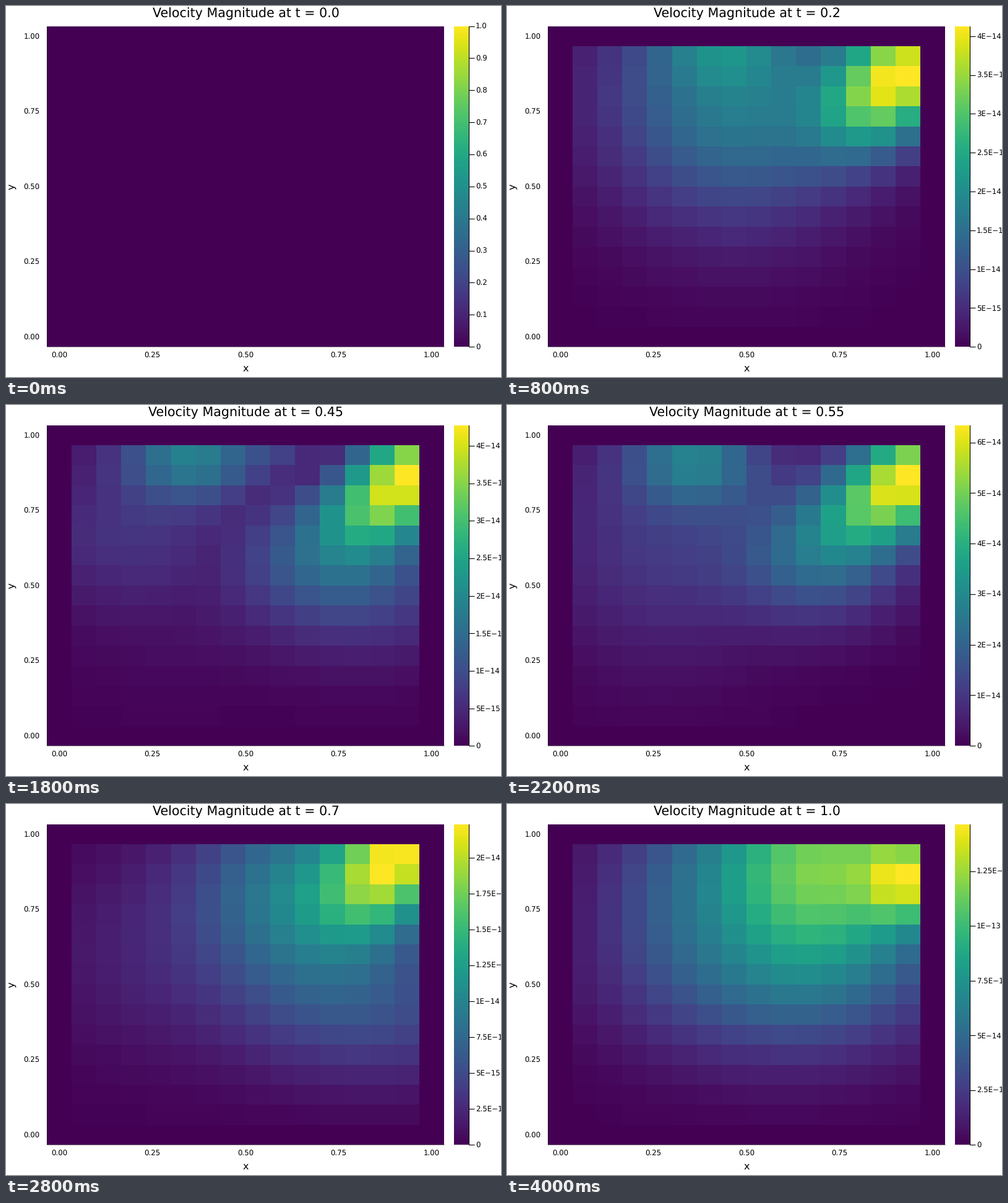
Animation of 800x600 px, one loop 4200 ms. Source, as a matplotlib script:

```python
import matplotlib.pyplot as plt
import numpy as np
from matplotlib.animation import FuncAnimation

W, H, DPI = 800, 600, 100
FRAMES, INTERVAL = 21, 200
N = 16  # cells per side
LEFT, RIGHT, TOP, BOTTOM = 65.8, 708.1, 32.6, 551.2
BAR_LEFT, BAR_RIGHT = 724, 748

X, Y = np.meshgrid(np.arange(N), np.arange(N))


def swirl(strength, x, y, width, height, tilt=0):
    """Gaussian patch of flow, in cells; tilt slopes its ridge."""
    ridge = y + tilt * (X - x)
    return strength * np.exp(-((X - x) / width) ** 2
                             - ((Y - ridge) / height) ** 2)


def speed(*swirls):
    """Relative speed of the summed flow, zero along the walls."""
    grid = np.zeros((N, N))
    grid[1:-1, 1:-1] = np.abs(sum(swirls))[1:-1, 1:-1]
    return grid / grid.max()


broad = speed(swirl(0.94, 13.7, 13, 2.8, 3, tilt=0.5),
              swirl(0.42, 7, 12, 5, 6),
              swirl(0.15, 6.5, 14.2, 2.5, 1.5))
split = speed(swirl(0.93, 14, 13, 2.6, 2.6, tilt=0.6),
              swirl(0.38, 12.5, 8, 4.5, 4),
              swirl(-0.42, 5.2, 14, 2.8, 2),
              swirl(-0.22, 9, 14.2, 1.6, 1.2),
              swirl(-0.15, 2, 10, 4, 3))
arched = speed(swirl(0.95, 14, 12.8, 3, 2.6, tilt=0.45),
               swirl(0.3, 10.5, 9, 3.5, 3.3),
               swirl(0.34, 5.5, 13.8, 2.6, 2.2),
               swirl(0.16, 4, 10, 4.5, 6))
corner = speed(swirl(0.8, 13.8, 14, 2.6, 3, tilt=0.5),
               swirl(0.45, 10, 12, 4.5, 5),
               swirl(0.18, 13, 6, 6, 3.5),
               swirl(0.07, 3, 9, 4, 5))
right = speed(swirl(0.88, 13, 14.2, 2.7, 2.6),
              swirl(0.25, 10.5, 11.5, 2.2, 2.2),
              swirl(0.42, 14, 8, 6.5, 5),
              swirl(0.03, 4, 13, 4, 3))
full = speed(swirl(0.72, 10.5, 13.5, 5, 5),
             swirl(0.48, 14, 12.7, 1.6, 2),
             swirl(0.25, 9, 7.5, 6, 4),
             swirl(0.12, 4, 12, 3, 5))

# Step, flow pattern and top speed in units of 1e-14
STAGES = [(1, right, 1.9), (3, corner, 3.2), (4, broad, 4.13),
          (7, split, 2.209), (11, arched, 6.343), (14, corner, 2.233),
          (17, right, 2.154), (20, full, 14.65)]


def state(step):
    """Relative speeds and top speed at a step."""
    if step == 0:
        return np.zeros((N, N)), 1.0
    for (a, old, old_peak), (b, new, new_peak) in zip(STAGES, STAGES[1:]):
        if step <= b:
            w = (step - a) / (b - a)
            grid = (1 - w) * old + w * new
            peak = (1 - w) * old_peak + w * new_peak
            return grid / grid.max(), peak * 1e-14


def tick_values(peak):
    power = np.floor(np.log10(peak)) - 1
    step = next(m * 10 ** power for m in (1, 2.5, 5, 10, 25)
                if peak / (m * 10 ** power) < 10.01)
    return np.arange(int(peak / step + 1e-6) + 1) * step


def tick_label(value):
    if value == 0:
        return "0"
    if value > 1e-3:
        return f"{value:.1f}"
    mantissa, exponent = f"{value:.4e}".split("e-")
    return f"{float(mantissa):g}E\u2212{int(exponent)}"


plt.rcParams.update({"font.family": "DejaVu Sans", "text.hinting": "none"})
fig = plt.figure(figsize=(W / DPI, H / DPI), dpi=DPI, facecolor="white")
ax = fig.add_axes([0, 0, 1, 1])


def label(x, y, text, px, ha="center", **kw):
    return ax.text(x, y, text, fontsize=px * 72 / DPI, ha=ha,
                   va="baseline", color="black", **kw)


def color_cells(left, right, values):
    rows, cols = values.shape
    return ax.pcolormesh(np.linspace(left, right, cols + 1),
                         np.linspace(BOTTOM, TOP, rows + 1), values,
                         cmap="viridis", vmin=0, vmax=1)


heat = color_cells(LEFT, RIGHT, np.zeros((N, N)))
color_cells(BAR_LEFT, BAR_RIGHT, np.linspace(0, 1, 256)[:, None])
ax.set_xlim(0, W)
ax.set_ylim(H, 0)
ax.axis("off")

ax.plot([LEFT, LEFT, RIGHT], [TOP, BOTTOM, BOTTOM], color="black", lw=0.5,
        alpha=0.6)
ax.plot([BAR_RIGHT + 0.3] * 2, [TOP, BOTTOM], color="black", lw=0.8)

for value in np.linspace(0, 1, 5):
    label(86 + 602 * value, 569, f"{value:.2f}", 11.75)
    label(54.8, 539.8 - 486 * value, f"{value:.2f}", 11.75, ha="right")
label(387, 590.6, "x", 16.1)
label(13.7, 292, "y", 16.1, rotation=90, rotation_mode="anchor")

title = label(387.5, 18.2, "", 20.6)
bar_ticks = ax.vlines([], 0, 1, color="black", lw=0.8)
bar_labels = [label(759.2, 0, "", 11.75, ha="left") for _ in range(11)]


def update(step):
    grid, peak = state(step)
    heat.set_array(grid)
    title.set_text(f"Velocity Magnitude at t = {round(step * 0.05, 2)}")
    values = tick_values(peak)
    heights = BOTTOM - (BOTTOM - TOP) * values / peak
    bar_ticks.set_segments([[(BAR_RIGHT, y), (BAR_RIGHT + 8.5, y)]
                            for y in heights])
    for text in bar_labels:
        text.set_text("")
    for text, value, y in zip(bar_labels, values, heights):
        text.set_text(tick_label(value))
        text.set_y(y + 4.2)
    return [heat, title, bar_ticks, *bar_labels]


anim = FuncAnimation(fig, update, frames=FRAMES, interval=INTERVAL,
                     repeat=True, repeat_delay=0, blit=False)
plt.show()
```
